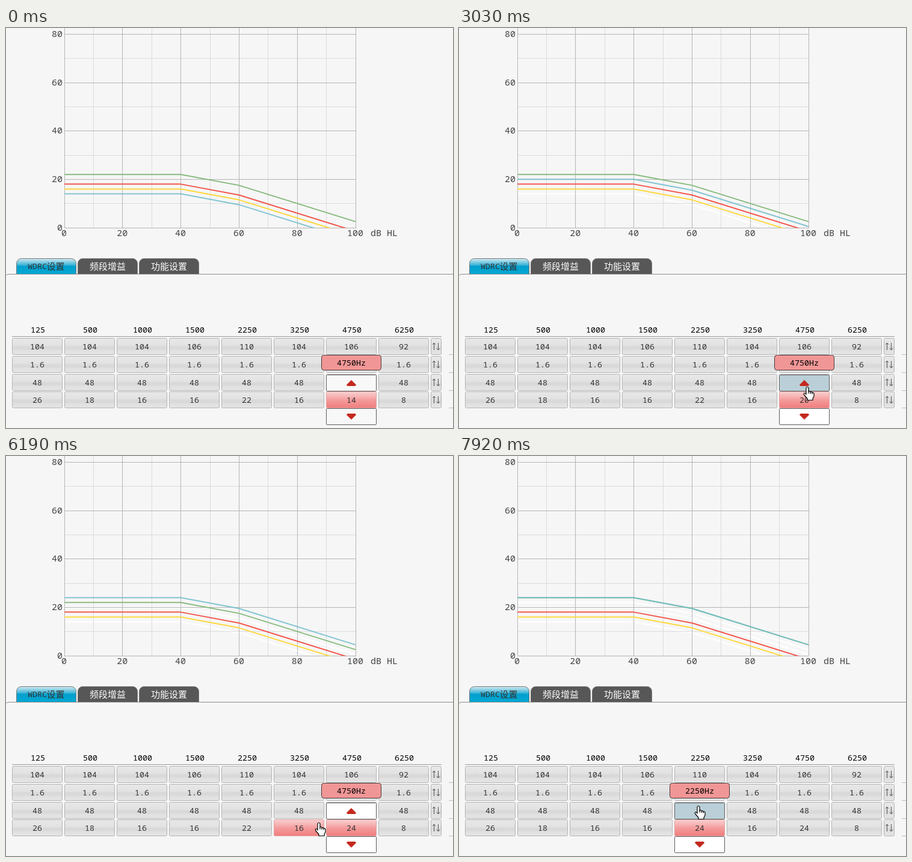
Animation of 743 by 667 pixels, one loop 8 s. Source, as an HTML page with a canvas:

```html
<!DOCTYPE html>
<html lang="zh">
<head>
<meta charset="utf-8">
<style>
html, body { margin: 0; width: 100%; height: 100%; overflow: hidden; background: #f6f6f6; }
canvas { display: block; }
</style>
</head>
<body>
<canvas id="stage" width="743" height="667"></canvas>
<script>
const ctx = document.getElementById('stage').getContext('2d');
const LOOP = 8000;
const MONO = '"Noto Sans Mono", monospace';
const SMALL = '13.33px ' + MONO;
const AXIS = '15px ' + MONO;
const CJK = '15px "Noto Sans CJK SC", "Noto Sans CJK", sans-serif';

const BANDS = [125, 500, 1000, 1500, 2250, 3250, 4750, 6250];
const LIMITS = [104, 104, 104, 106, 110, 104, 106, 92];
const GAINS = [26, 18, 16, 16, 22, 16, 14, 8];
const ROWS = [517, 547, 577, 606];
const STEPS = [1190, 2250, 3030, 3760, 4520];
const PRESSES = [[1660, 1880], [2550, 2710], [3310, 3470], [4070, 4230], [7530, 7610]];

// time, x, y of the pointer tip
const PATH = [
  [60, 620, 644], [210, 602, 626], [360, 582, 599], [499, 582, 599], [500, 579, 598],
  [4520, 579, 598], [5609, 579, 598], [5610, 576, 598], [5900, 562, 610], [6150, 520, 611],
  [6410, 455, 611], [6490, 447, 611], [6710, 430, 611], [7239, 430, 611],
  [7240, 412, 602], [7380, 398, 583]
];

const GREY = [[0, '#e8e8e8'], [.45, '#e2e2e2'], [.5, '#d9d9d9'], [.66, '#d9d9d9'], [.72, '#e0e0e0'], [1, '#e5e5e5']];
const PINK = [[0, '#fad2d2'], [.3, '#f6b4b4'], [.5, '#f49c9c'], [1, '#f07c7c']];
const RED = [[0, '#f67474'], [.2, '#f24040'], [.5, '#ee1414'], [.75, '#f04040'], [1, '#f47c7c']];

const gx = v => 97 + 4.84 * v;
const gy = v => 333 - 4.035 * v;
const cellX = i => 10 + 87 * i;

function text(s, x, y, font = SMALL, color = '#333', align = 'center') {
  ctx.font = font;
  ctx.fillStyle = color;
  ctx.textAlign = align;
  ctx.fillText(s, x, y);
}

function line(x1, y1, x2, y2, color) {
  ctx.strokeStyle = color;
  ctx.lineWidth = 1;
  ctx.beginPath();
  ctx.moveTo(x1, y1);
  ctx.lineTo(x2, y2);
  ctx.stroke();
}

function vertical(stops, y, h) {
  const g = ctx.createLinearGradient(0, y, 0, y + h);
  stops.forEach(([p, c]) => g.addColorStop(p, c));
  return g;
}

function box(x, y, w, h, r, fill, border) {
  ctx.beginPath();
  ctx.roundRect(x + .5, y + .5, w - 1, h - 1, r);
  ctx.fillStyle = fill;
  ctx.fill();
  ctx.strokeStyle = border;
  ctx.lineWidth = 1;
  ctx.stroke();
}

function curve(v, color, width = 2) {
  ctx.strokeStyle = color;
  ctx.lineWidth = width;
  ctx.beginPath();
  [[0, 0], [40, 0], [60, 4.5], [100, 19.5]].forEach(([x, drop]) => ctx.lineTo(gx(x), gy(v - drop)));
  ctx.stroke();
}

function clipped(draw) {
  ctx.save();
  ctx.beginPath();
  ctx.rect(97, 0, 485, 333.5);
  ctx.clip();
  draw();
  ctx.restore();
}

function chart(blue, green) {
  clipped(() => {
    for (let v = 14; v < blue; v += 2) curve(v, '#fdfdfd', 3);
  });
  for (const minor of [true, false]) {
    const color = minor ? '#dcdcdc' : '#b5b5b5';
    for (let v = minor ? 10 : 0; v <= 100; v += 20) {
      const x = Math.floor(gx(v)) + .5;
      line(x, 0, x, 333, color);
      if (v > 80) continue;
      const y = Math.floor(gy(v) + .2) + .5;
      line(97, y, 582, y, color);
    }
  }
  clipped(() => {
    curve(16, '#fdd63c');
    curve(18, '#f2564c');
    curve(green, '#86ba7c');
    ctx.globalAlpha = .88;
    curve(blue, '#72bfcc');
    ctx.globalAlpha = 1;
  });
  for (let v = 0; v <= 100; v += 20) {
    if (v <= 80) text(v, 94, Math.floor(gy(v) + .2) + 5, AXIS, '#444', 'right');
    text(v, gx(v) - .5, 347, AXIS, '#444');
  }
  text('dB HL', 606, 347, AXIS, '#444', 'left');
}

function tab(x, fill) {
  ctx.beginPath();
  ctx.roundRect(x + .5, 384.5, 99, 26, [8, 8, 0, 0]);
  ctx.fillStyle = fill;
  ctx.fill();
  ctx.strokeStyle = '#777';
  ctx.lineWidth = 1;
  ctx.stroke();
}

function tabs() {
  tab(17, vertical([[0, '#d8eef5'], [.15, '#a4d9e9'], [.45, '#36b2d6'], [.5, '#009fcd'], [1, '#06a8d4']], 384, 26));
  tab(119, '#575757');
  tab(221, '#575757');
  text('WDRC', 36, 402, SMALL, '#333', 'left');
  text('设置', 67.5, 402.5, CJK, '#333', 'left');
  text('频段增益', 169, 402.5, CJK, '#fff');
  text('功能设置', 271, 402.5, CJK, '#fff');
  ctx.strokeStyle = '#8c8c8c';
  ctx.beginPath();
  ctx.moveTo(0, 412.5);
  ctx.quadraticCurveTo(1.5, 410.5, 5, 410.5);
  ctx.lineTo(743, 410.5);
  ctx.stroke();
}

function sortButton(y) {
  box(706, y, 18, 28, 2, vertical(GREY, y, 28), '#b4b4b4');
  ctx.strokeStyle = '#555';
  ctx.beginPath();
  for (const [x, dir] of [[711.5, -1], [718.5, 1]]) {
    const tip = y + 14 + 6 * dir;
    ctx.moveTo(x, tip - 12 * dir);
    ctx.lineTo(x, tip);
    ctx.moveTo(x - 2.5, tip - 3 * dir);
    ctx.lineTo(x, tip);
    ctx.lineTo(x + 2.5, tip - 3 * dir);
  }
  ctx.stroke();
}

function table(gains, skins) {
  BANDS.forEach((hz, i) => text(hz, cellX(i) + 43, 508, SMALL, '#000'));
  line(10, 514.5, 724, 514.5, '#999');
  ROWS.forEach((y, r) => {
    for (let i = 0; i < 8; i++) {
      const skin = r === 3 && skins[i] || GREY;
      const shift = skin === RED ? 1.5 : 0;
      const value = [LIMITS[i], '1.6', 48, gains[i]][r];
      const border = skin === RED ? '#8a4040' : skin === PINK ? '#e2a0a0' : '#b4b4b4';
      box(cellX(i), y, 84, 28, 2, vertical(skin, y, 28), border);
      text(value, cellX(i) + 42 + shift, y + 19 + shift);
    }
    sortButton(y);
    line(736, y + 27.5, 743, y + 27.5, '#bbb');
  });
}

function arrow(x, y, dir) {
  ctx.fillStyle = ctx.strokeStyle = '#c4281e';
  ctx.lineJoin = 'round';
  ctx.lineWidth = 1;
  ctx.beginPath();
  ctx.moveTo(x, y - 4.5 * dir);
  ctx.lineTo(x + 7.5, y + 3 * dir);
  ctx.lineTo(x + 6.5, y + 4.5 * dir);
  ctx.lineTo(x - 6.5, y + 4.5 * dir);
  ctx.lineTo(x - 7.5, y + 3 * dir);
  ctx.closePath();
  ctx.fill();
  ctx.stroke();
}

function inside(p, x, y, h) {
  return p && p.x >= x && p.x < x + 84 && p.y >= y && p.y < y + h;
}

function spinner(col, p, pressed, t) {
  const x = cellX(col), mid = x + 42;
  const idle = t < 60 ? '#f8f8f8' : '#fff';
  const up = inside(p, x, 578, 28), down = inside(p, x, 634, 28);
  box(x, 578, 84, 28, 1, pressed ? '#a9c2cc' : up ? '#bacfd7' : idle, '#5c5c5c');
  box(x, 634, 84, 28, 1, down ? '#bacfd7' : idle, '#5c5c5c');
  if (t < 7380) arrow(mid + (pressed ? 1 : 0), 592 + (pressed ? 1 : 0), 1);
  arrow(mid, 648, -1);
  box(x - 8, 545, 100, 26, 4, '#f19696', '#443a3a');
  text(BANDS[col] + 'Hz', mid, 563, SMALL, '#000');
}

function pointer(t) {
  if (t < PATH[0][0]) return null;
  let i = PATH.length - 1;
  while (PATH[i][0] > t) i--;
  const [t0, x0, y0] = PATH[i];
  const [t1, x1, y1] = PATH[i + 1] || [t0 + 1, x0, y0];
  const stepped = Math.floor((t - t0) / 72) * 72;
  const k = Math.min(1, stepped / (t1 - t0));
  return { x: Math.round(x0 + (x1 - x0) * k), y: Math.round(y0 + (y1 - y0) * k) };
}

function hand({ x, y }) {
  ctx.save();
  ctx.translate(x, y);
  const shape = new Path2D('M-2 2Q0-1 2 2V8Q4 6.5 5 9Q7.5 8 8 10Q11 9.5 11 12V16L9 20V22.5H0V20L-5.5 13.5Q-6.5 10-3.5 11L-2 13Z');
  ctx.fillStyle = '#fff';
  ctx.fill(shape);
  ctx.strokeStyle = '#000';
  ctx.lineWidth = 1.2;
  ctx.lineJoin = 'round';
  ctx.stroke(shape);
  ctx.stroke(new Path2D('M2 7V11.5M5 9V12M8 10V12.5'));
  ctx.restore();
}

function draw(t) {
  ctx.fillStyle = '#f6f6f6';
  ctx.fillRect(0, 0, 743, 667);
  const p = pointer(t);
  const blue = 14 + 2 * STEPS.filter(s => t >= s).length;
  const green = t >= 7920 ? 24 : 22;
  const active = t >= 6940 ? 4 : 6;
  const pressed = PRESSES.some(([a, b]) => t >= a && t < b);

  const gains = GAINS.slice();
  gains[6] = blue;
  gains[4] = green;
  const skins = { [active]: PINK };
  BANDS.forEach((_, i) => {
    if (inside(p, cellX(i), 606, 28)) skins[i] = PINK;
  });
  if (t >= 6870 && t < 6940) skins[4] = RED;

  chart(blue, green);
  tabs();
  table(gains, skins);
  spinner(active, p, pressed, t);
  if (p) hand(p);
}

const start = performance.now();
function tick() {
  draw((performance.now() - start) % LOOP);
  requestAnimationFrame(tick);
}
tick();
</script>
</body>
</html>
```
